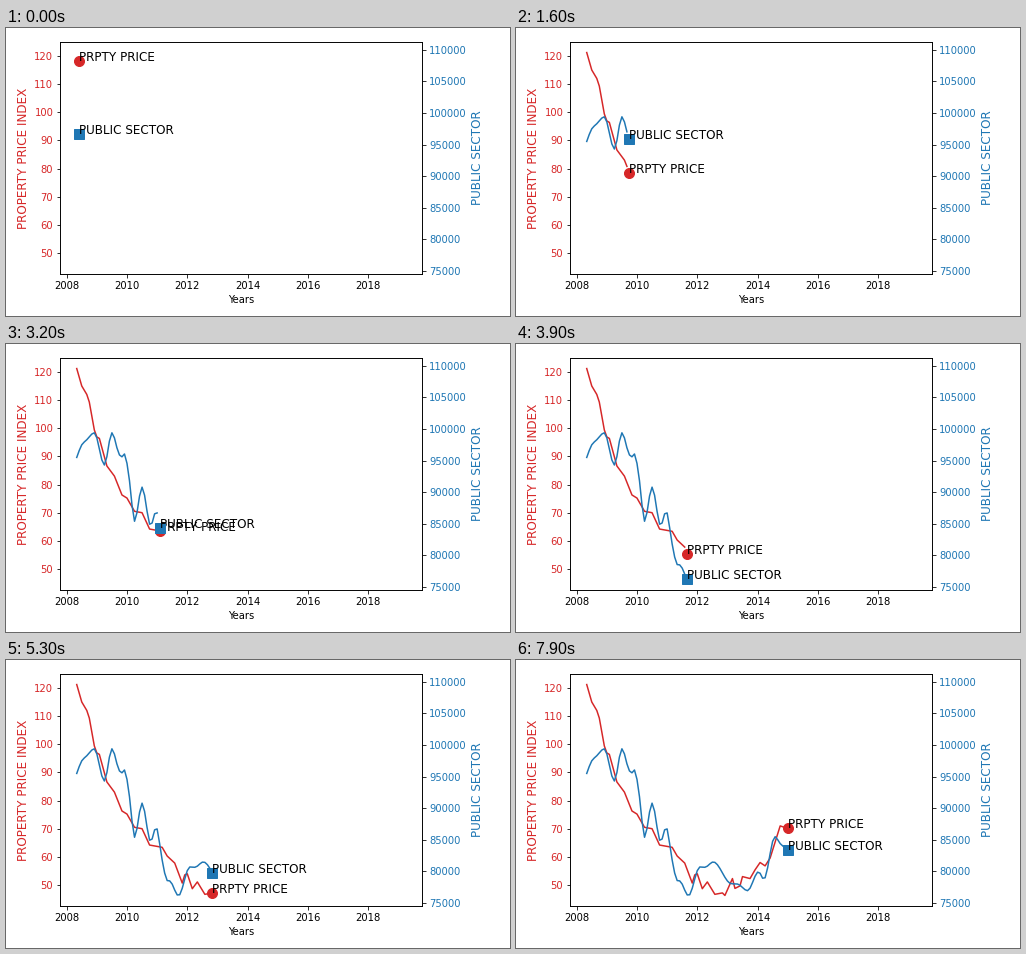
Animation, 504 px wide and 288 px high, one loop 8 s. Source, as a matplotlib script:

```python
import numpy as np
import matplotlib.pyplot as plt
from matplotlib.animation import FuncAnimation

plt.rcParams["font.family"] = "DejaVu Sans"

W, H = 504, 288
FRAMES, STEP_MS = 80, 100
RED, BLUE = "tab:red", "tab:blue"

months = np.arange(FRAMES + 1)
years = 2008 + (months + 4) / 12


def smooth(x, keys):
    """Cubic curve through the keys, flat at each peak and dip."""
    kx, ky = np.array(keys, float).T
    h = np.diff(kx)
    s = np.diff(ky) / h
    a, b = s[:-1], s[1:]
    same = a * b > 0
    inner = np.where(same, 2 * a * b / np.where(same, a + b, 1), 0)
    m = np.concatenate(([s[0]], inner, [s[-1]]))
    i = np.clip(np.searchsorted(kx, x, side="right") - 1, 0, len(h) - 1)
    t = (x - kx[i]) / h[i]
    ease = t * t * (3 - 2 * t)
    bend = h[i] * t * (1 - t) * ((1 - t) * m[i] - t * m[i + 1])
    return ky[i] + (ky[i + 1] - ky[i]) * ease + bend


# Key points as (month, value): the price runs straight between its turns,
# the head count (in thousands) swings smoothly
price_keys = [
    (0, 121.2), (2, 115), (4, 112), (5, 109.3), (7, 99.4), (8, 96.9),
    (9, 96.4), (12, 86.6), (15, 83), (18, 76.3), (20, 75.2), (23, 70.5),
    (26, 70), (29, 64.2), (34, 63.4), (36, 60.3), (39, 57.8), (42, 50.7),
    (43, 53.6), (44, 54), (46, 48.7), (48, 51.1), (51, 46.7), (54, 47.2),
    (55, 46.3), (58, 52.3), (59, 48.8), (61, 49.7), (62, 53), (65, 52.3),
    (67, 55.4), (69, 58), (71, 56.8), (73, 59.6), (77, 71), (80, 70.1)]
staff_keys = [
    (0, 95.5), (2, 97.5), (4, 98.3), (7, 99.4), (11, 94.3), (14, 99.4),
    (17, 95.9), (18, 95.6), (19, 96.05), (21, 91.8), (23, 85.4), (26, 90.8),
    (29.4, 84.7), (31.6, 87), (34, 81.8), (36, 78.55), (37, 78.5),
    (40.5, 76.15), (45, 80.7), (47, 80.65), (50.4, 81.5), (57.5, 78.05),
    (60, 78), (64, 76.95), (68.4, 79.95), (70.5, 78.75), (74.9, 85.5),
    (77, 84.4), (80, 83.4)]

price = np.interp(months, *zip(*price_keys))
staff = 1000 * smooth(months, staff_keys)

fig = plt.figure(figsize=(W / 72, H / 72), dpi=72, facecolor="white")
left, bottom, width, height = 54.3, 42, 362, 232
ax = fig.add_axes([left / W, bottom / H, width / W, height / H])
ax2 = ax.twinx()

ax.set_xlim(2007.788, 2019.796)
ax.set_xticks(range(2008, 2020, 2))
ax.set_xlabel("Years", fontsize=10)


def style_y(axis, label, color, limits, ticks):
    axis.set_ylim(*limits)
    axis.set_yticks(ticks)
    axis.set_ylabel(label, color=color, fontsize=12)
    axis.tick_params(axis="y", labelcolor=color)


style_y(ax, "PROPERTY PRICE INDEX", RED, (42.555, 124.945), range(50, 121, 10))
style_y(ax2, "PUBLIC SECTOR", BLUE, (74525, 111234), range(75000, 110001, 5000))


class Series:
    """A growing line led by a labelled marker one month ahead."""

    def __init__(self, axis, values, color, marker, label):
        self.values = values
        self.line, = axis.plot([], [], color=color, lw=1.5)
        self.head, = axis.plot([], [], color=color, marker=marker, ms=10, ls="")
        self.label = axis.text(years[0], values[0], label, fontsize=12)

    def show(self, i):
        self.line.set_data(years[:i + 1], self.values[:i + 1])
        x, y = years[i + 1], self.values[i + 1]
        self.head.set_data([x], [y])
        self.label.set_position((x, y))
        return self.line, self.head, self.label


series = [Series(ax, price, RED, "o", "PRPTY PRICE"),
          Series(ax2, staff, BLUE, "s", "PUBLIC SECTOR")]


def update(i):
    return [artist for s in series for artist in s.show(i)]


anim = FuncAnimation(fig, update, frames=FRAMES, init_func=lambda: update(0),
                     interval=STEP_MS, repeat=True, repeat_delay=0, blit=False)
plt.show()
```
